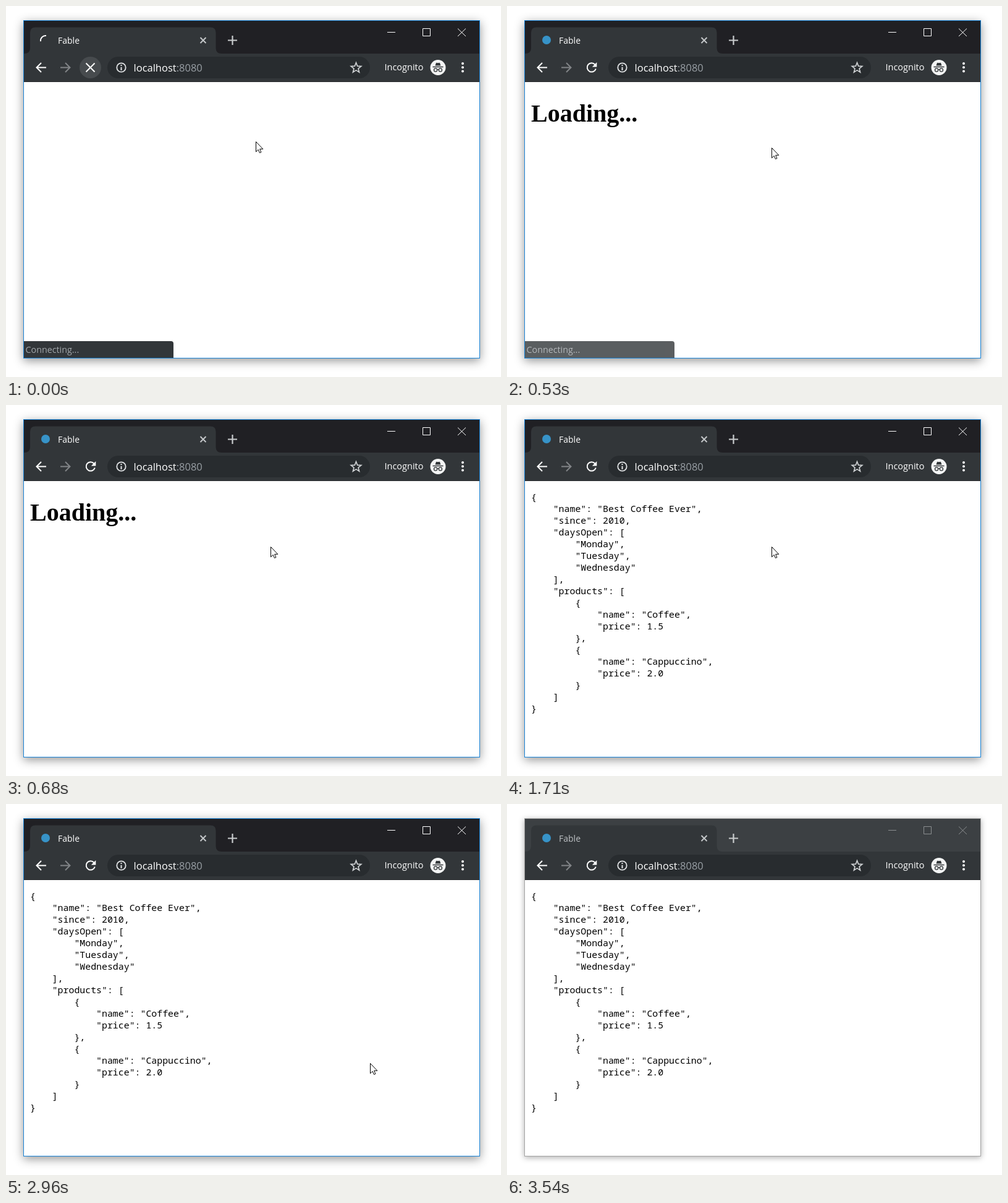
Animation of 801 by 600 pixels, one loop 3670 ms. Source, as an HTML page:

```html
<!DOCTYPE html>
<html lang="en">
<head>
<meta charset="utf-8">
<title>Page load</title>
<style>
html, body { margin: 0; width: 100%; height: 100%; overflow: hidden; background: #fff; }
svg { display: block; width: 100%; height: 100%; }
text { white-space: pre; }
.ui { font-family: "Open Sans", "Noto Sans", sans-serif; }
.line { fill: none; stroke: #fff; stroke-width: 2; }
#json { font: 14.89px "Noto Sans Mono", monospace; }
#frame { filter: drop-shadow(0 4px 8px rgba(0,0,0,.42)); }
#frame.idle { filter: drop-shadow(0 2px 5px rgba(0,0,0,.32)); }
</style>
</head>
<body>
<svg viewBox="0 0 801 600">
  <rect id="frame" x="28" y="23" width="739" height="547"/>
  <rect id="titlebar" x="29" y="24" width="737" height="53"/>
  <rect x="29" y="123" width="737" height="446" fill="#fff"/>

  <!-- tab and toolbar -->
  <path fill="#323639" d="M29 77Q39 77 39 68V43Q39 34.500 47.500 34.500H331Q339.500 34.500 339.500 43V68Q339.500 77 349 77H766V123H29Z"/>
  <path d="M29 122.500H766" stroke="#292c2f"/>
  <text id="tabTitle" class="ui" x="84" y="61" font-size="14">Fable</text>
  <circle id="favicon" cx="64" cy="55" r="7" fill="#3793c8"/>
  <path id="spinner" class="line" d="M56 57A8 8 0 0 1 65 48.100" stroke-width="2.500"/>
  <path class="line" d="M314.500 51L323.500 60M323.500 51L314.500 60" style="stroke:#c4c7c9"/>
  <path class="line" d="M359 55.500H374M366.500 48V63" style="stroke:#c9cccd;stroke-width:2.200"/>
  <path id="winButtons" fill="none" d="M617 42.500H630M674.500 36.500H686.500V48.500H674.500ZM731 36.500L744 49M744 36.500L731 49"/>

  <path id="arrow" class="line" d="M65 99.500H50M57 92L49.500 99.500L57 107"/>
  <path class="line" d="M88 99.500H103M96 92L103.500 99.500L96 107" style="stroke:#818487"/>
  <g id="stop">
    <circle cx="136.500" cy="99.500" r="17.500" fill="#474b4e"/>
    <path class="line" d="M129.500 92.500L143.500 106.500M143.500 92.500L129.500 106.500"/>
  </g>
  <g id="reload">
    <path class="line" d="M142.300 94.600A7.200 7.200 0 1 0 143.800 101.500"/>
    <path fill="#fff" d="M145.300 91V98.500H137.800Z"/>
  </g>

  <rect x="164" y="82" width="425" height="35" rx="17.500" fill="#282c2f"/>
  <circle class="line" cx="186.500" cy="99.500" r="7.200" style="stroke:#e1e3e5;stroke-width:1.800"/>
  <path d="M186.500 95V97M186.500 98.700V104" stroke="#e1e3e5" stroke-width="2"/>
  <text class="ui" x="206.500" y="106" font-size="16.500" fill="#fff">localhost<tspan fill="#9aa0a6">:8080</tspan></text>
  <path id="star" class="line" style="stroke:#cfd2d4;stroke-width:1.700"/>
  <text class="ui" x="612.500" y="104" font-size="14.500" fill="#fff">Incognito</text>
  <circle cx="699" cy="99.500" r="12.500" fill="#f4f5f5"/>
  <path fill="#323639" d="M694.500 96.500L696 92Q697 91.400 699 92.300Q701 91.400 702 92L703.500 96.500ZM690.500 97.800H707.500V99.200H690.500Z"/>
  <path fill="none" stroke="#323639" stroke-width="1.300" d="M692.500 103.500a2.600 2.600 0 1 0 5.200 0a2.600 2.600 0 1 0 -5.200 0M700.300 103.500a2.600 2.600 0 1 0 5.200 0a2.600 2.600 0 1 0 -5.200 0M697.700 103Q699 102.200 700.300 103"/>
  <g fill="#fff">
    <circle cx="739" cy="93" r="2"/><circle cx="739" cy="99.300" r="2"/><circle cx="739" cy="105.600" r="2"/>
  </g>

  <!-- page -->
  <text id="loading" x="39" y="187" font-family="'Liberation Serif', serif" font-weight="700" font-size="40">Loading...</text>
  <g id="json"></g>
  <g id="status">
    <path fill="#323639" d="M28 542H267Q271 542 271 546V570H28Z"/>
    <text class="ui" x="31.500" y="561" font-size="14.300" fill="#a3a8ac">Connecting...</text>
  </g>
  <rect id="border" x="28.500" y="23.500" width="738" height="546" fill="none"/>
  <path id="cursor" d="M.5 .5V16.800L4.200 13.300L6.500 18.500L8.900 17.500L6.700 12.300H11.800Z" fill="#fff" stroke="#000"/>
</svg>
<script>
const LOOP = 3670;
const LOADED = 240, READY = 280, DATA = 1710, LEAVE = 2710, GONE = 3260, BLUR = 3540;
const $ = id => document.getElementById(id);
const set = (id, attrs) => {
  for (const key in attrs) $(id).setAttribute(key, attrs[key]);
};
const show = (id, on) => set(id, { visibility: on ? "visible" : "hidden" });
const clamp = x => Math.max(0, Math.min(1, x));
const mix = (a, b, p) => Math.round(a + (b - a) * p);

const source = `{
    "name": "Best Coffee Ever",
    "since": 2010,
    "daysOpen": [
        "Monday",
        "Tuesday",
        "Wednesday"
    ],
    "products": [
        {
            "name": "Coffee",
            "price": 1.5
        },
        {
            "name": "Cappuccino",
            "price": 2.0
        }
    ]
}`;
source.split("\n").forEach((line, i) => {
  const row = document.createElementNS("http://www.w3.org/2000/svg", "text");
  row.setAttribute("x", 39);
  row.setAttribute("y", 154 + i * 19);
  row.textContent = line;
  $("json").append(row);
});

const starPoints = Array.from({ length: 10 }, (_, i) => {
  const a = i * Math.PI / 5, r = i % 2 ? 3.7 : 8.6;
  return `${(566.5 + r * Math.sin(a)).toFixed(2)} ${(100.2 - r * Math.cos(a)).toFixed(2)}`;
});
set("star", { d: `M${starPoints.join("L")}Z` });

// Progress in equal hard steps, the first one at the start time.
const stepped = (t, start, gap, count) =>
  t < start ? 0 : Math.min(count, Math.floor((t - start) / gap) + 1) / count;

function cursorAt(t) {
  if (t < LEAVE) {
    const p = stepped(t, 20, 40, 10);
    const e = p * p * (3 - 2 * p);
    return [mix(404, 428, e), mix(219, 229, e)];
  }
  if (t >= 3240) return [735, 592];
  const p = stepped(t, LEAVE, 25, 21);
  const e = p < 0.06 ? 0.003 : p * p * (3 - 2 * p);
  return [mix(428, 728, e), mix(229, 583, e)];
}

function statusOpacity(t) {
  return t < 530 ? 1 : t < 580 ? 0.8 : t < 630 ? 0.54 : t < 680 ? 0.28 : 0;
}

function draw(t) {
  const ready = t >= READY, idle = t >= BLUR;
  show("spinner", !ready);
  show("stop", !ready);
  show("favicon", ready);
  show("reload", ready);
  show("loading", t >= LOADED && t < DATA);
  show("json", t >= DATA);
  show("cursor", t < GONE);
  set("spinner", { transform: `rotate(${-360 * clamp(t / 1320)} 64 56)` });
  set("status", { opacity: statusOpacity(t) });
  set("cursor", { transform: `translate(${cursorAt(t)})` });
  set("frame", { class: idle ? "idle" : "" });
  set("titlebar", { fill: idle ? "#3c4043" : "#202024" });
  set("tabTitle", { fill: idle ? "#bdc1c4" : "#fff" });
  set("winButtons", { stroke: idle ? "#8b8e90" : "#fff" });
  set("border", { stroke: idle ? "#a4a4a4" : "#1883d7" });
}

const begin = performance.now();
function tick() {
  draw((performance.now() - begin) % LOOP);
  requestAnimationFrame(tick);
}
tick();
</script>
</body>
</html>
```
